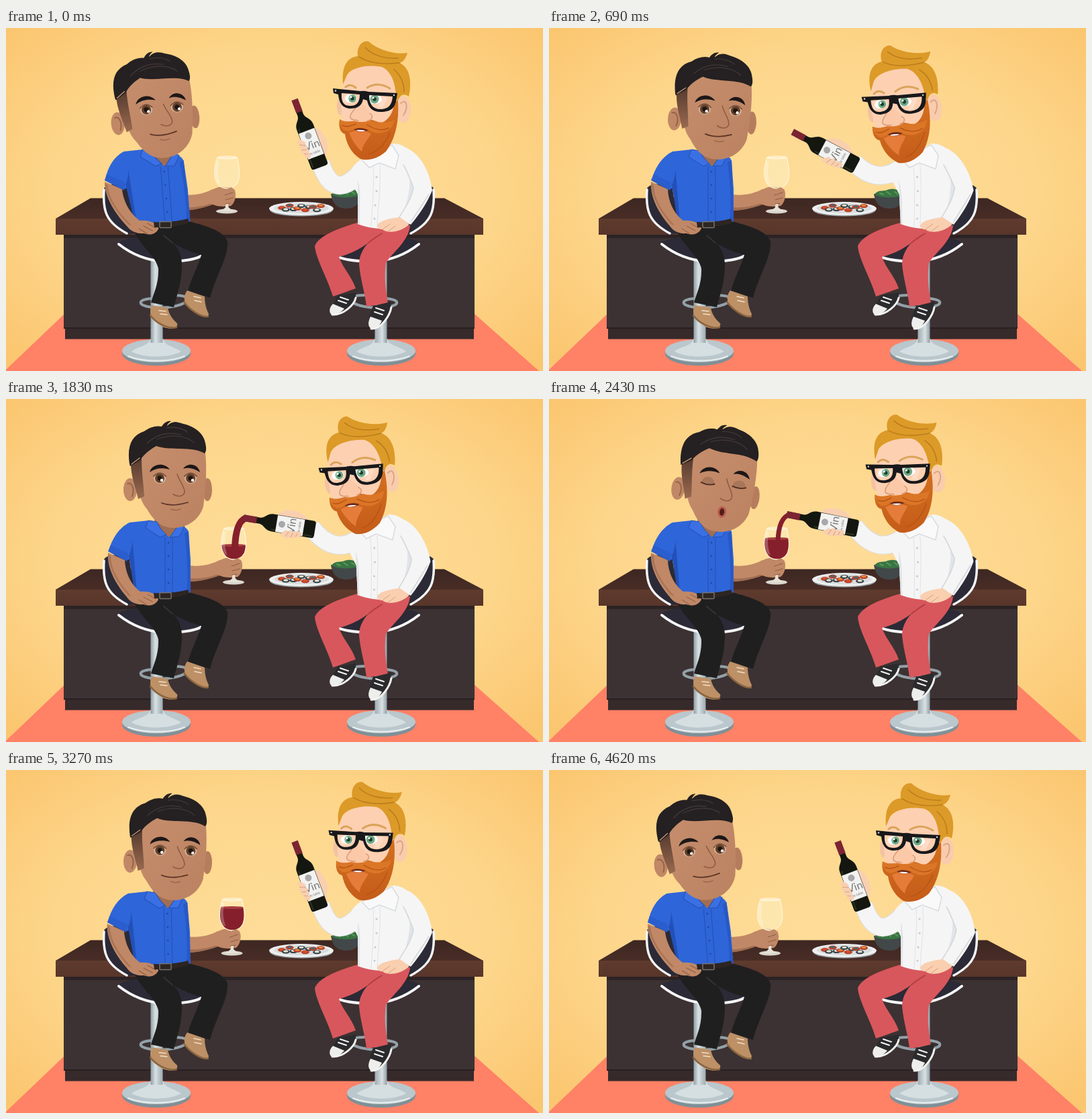
Recreate the animation shown at these times as an HTML page. Size 800x511 px, loop 4.65 s.

```html
<!DOCTYPE html>
<html lang="en">
<head>
<meta charset="utf-8">
<title>Wine bar</title>
<style>
html, body { margin: 0; height: 100%; overflow: hidden; background: #fcd78c; }
svg { display: block; width: 100%; height: 100%; }
.line { fill: none; stroke-linecap: round; stroke-linejoin: round; }
</style>
</head>
<body>
<svg viewBox="0 0 800 511">
<defs>
  <radialGradient id="wall" cx=".5" cy=".48" r=".68"><stop offset="0" stop-color="#fedd99"/><stop offset=".6" stop-color="#fdd68b"/><stop offset="1" stop-color="#fbc670"/></radialGradient>
  <linearGradient id="top" x2="0" y2="1"><stop stop-color="#3d2722"/><stop offset="1" stop-color="#492d26"/></linearGradient>
  <linearGradient id="edge" x2="0" y2="1"><stop stop-color="#5f3b2e"/><stop offset="1" stop-color="#58352a"/></linearGradient>
  <linearGradient id="steel"><stop stop-color="#8f9ea5"/><stop offset=".4" stop-color="#d9e1e4"/><stop offset="1" stop-color="#9dabb1"/></linearGradient>
  <linearGradient id="fade" x2="0" y2="1"><stop stop-color="#4b3329"/><stop offset="1" stop-color="#9a6a50"/></linearGradient>
  <linearGradient id="skin" x2="1" y2="1"><stop stop-color="#c68e6d"/><stop offset="1" stop-color="#bb8261"/></linearGradient>
  <linearGradient id="ginger" x2="0" y2="1"><stop stop-color="#d2701f"/><stop offset="1" stop-color="#c55c1a"/></linearGradient>
  <path id="bowl" d="M325 193C320 208 319 221 324 230C328 237 334 239 339 239C345 239 351 237 355 230C359 221 358 208 354 193Z"/>
  <clipPath id="inBowl"><use href="#bowl"/></clipPath>
  <g id="stool">
    <ellipse cx="224" cy="485" rx="51" ry="18" fill="#7f9097"/>
    <ellipse cx="224" cy="481" rx="51" ry="17" fill="#bac7cc"/>
    <path d="M215 463C213 474 196 474 187 482C205 492 243 492 261 482C250 474 236 474 234 463Z" fill="#d5dee1"/>
    <path class="line" d="M182 489C205 498 244 498 266 489" stroke="#e9eff0" stroke-width="2"/>
    <path class="line" d="M216 403C195 405 196 413 216 416C240 419 268 413 271 404C270 398 250 397 234 399" stroke="#93a1a7" stroke-width="4"/>
    <rect x="215.500" y="338" width="18" height="131" fill="url(#steel)"/>
    <path d="M146 239C150 232 165 231 183 233L194 306L178 307C154 294 145 278 146 239Z" fill="#2b2a36"/>
    <path class="line" d="M146 241C144 271 148 289 180 306" stroke="#f5f6f8" stroke-width="3.500"/>
    <path d="M167 320C185 306 270 306 293 337C280 347 255 350 235 349C205 347 180 337 167 320Z" fill="#2b2a36"/>
    <path class="line" d="M168 322C187 337 208 346 235 348C262 348 282 345 292 339" stroke="#f5f6f8" stroke-width="4"/>
  </g>
</defs>

<rect width="800" height="511" fill="url(#wall)"/>
<path d="M88 425H697L794 511H-2Z" fill="#ff8166"/>

<path d="M126 253.500H653L711 284H74Z" fill="url(#top)"/>
<path d="M86 308H698V447H86Z" fill="#3c3233"/>
<path d="M86 308H698V313H86Z" fill="#2c2324"/>
<path d="M74 284H711V308H74Z" fill="url(#edge)"/>
<path d="M88 447H697V463.500H88Z" fill="#362a2b"/>
<path d="M86 446H698V448H86Z" fill="#282021"/>

<ellipse cx="440" cy="271" rx="47" ry="9.500" fill="#9aa2a6"/>
<ellipse cx="440" cy="269" rx="48" ry="10" fill="#eef0f0"/>
<ellipse cx="440" cy="268.500" rx="41" ry="7.500" fill="#d9dddd"/>
<g id="snacks"></g>
<path d="M484 247C486 262 494 269 507 269S528 262 530 247Z" fill="#42484a"/>
<path d="M485 248C490 240 500 244 504 241C512 238 520 240 530 247C520 254 495 254 485 248Z" fill="#397443"/>
<path class="line" d="M493 246l5 2M503 244l6 4M515 244l4 3" stroke="#5a9a58" stroke-width="2"/>

<use href="#stool"/>
<use href="#stool" transform="translate(783) scale(-1 1)"/>

<g id="glassArm">
  <path d="M262 246C285 252 305 247 318 240L326 260C305 268 288 273 262 272Z" fill="#c08866"/>
  <path d="M262 266C288 270 308 265 324 258L326 260C305 268 288 273 262 272Z" fill="#a06e52"/>
  <path d="M311 246C318 238 330 235 340 237L350 240C354 246 352 260 345 265C332 267 318 266 311 258Z" fill="#c08866"/>
  <ellipse cx="339" cy="273" rx="16" ry="3.500" fill="#d9d5cd"/>
  <path d="M338 238H340.500L341.500 267C345 271 349 272 352 273H326C330 272 334 271 337 267Z" fill="#e6e2d8"/>
  <use href="#bowl" fill="#fdeebf" fill-opacity=".6"/>
  <g clip-path="url(#inBowl)">
    <rect id="wine" x="318" y="205" width="44" height="40" fill="#861f2c"/>
    <ellipse id="surface" cx="339" cy="205" rx="18" ry="2" fill="#a53c40"/>
    <path d="M324 198C321 210 321 222 325 230L330 233C325 220 325 210 328 198Z" fill="#fff" opacity=".25"/>
  </g>
  <use href="#bowl" fill="none" stroke="#fff4d8" stroke-width="1.300"/>
  <ellipse cx="339.500" cy="193" rx="14.500" ry="2" fill="none" stroke="#fffbe9"/>
  <path class="line" d="M333 246L345 241M335 252L348 249M335 259L346 257" stroke="#c08866" stroke-width="7"/>
  <path class="line" d="M336 249L348 245M337 256L348 253M337 262L344 261" stroke="#8a5c42" stroke-width="1"/>
</g>

<path d="M190 301L272 288C300 295 325 303 330 318C332 340 312 370 304 402L271 392C277 370 285 358 291 338C275 334 262 328 248 320C258 328 262 342 262 352C262 380 255 395 250 416L216 409C220 395 228 380 227 358C222 338 200 325 190 301Z" fill="#1f1f20"/>
<path class="line" d="M248 320L235 309" stroke="#343435" stroke-width="2"/>
<path d="M217 413C212 427 216 436 235 446C248 450 257 447 255 440C247 433 243 426 241 417Z" fill="#bd9066"/>
<path d="M270 391C262 402 265 412 280 422C292 431 302 433 302 426C298 418 296 410 296 400Z" fill="#bd9066"/>
<path class="line" d="M215 428C222 438 240 449 254 446M265 408C274 420 290 431 301 430" stroke="#8a6540" stroke-width="2.500"/>
<path class="line" d="M228 421l10 1M230 426l10 1M280 400l10 2M281 406l10 2" stroke="#f0e0c8" stroke-width="1.500"/>

<g id="leftBody">
  <path d="M220 170H262V205L243 214L224 203Z" fill="#a06d52"/>
  <path d="M212 181L226 186C230 194 237 201 243 206L257 190C264 188 270 192 272 198L275 240V288C250 293 215 293 192 290L185 238L181 240L153 226C158 208 168 192 184 184Z" fill="#2e65d8"/>
  <path d="M183 234C188 222 189 212 188 206L195 289H192Z" fill="#2350b8"/>
  <path d="M266 200L272 197L275 288L269 290C272 265 270 230 266 200Z" fill="#2758c6"/>
  <path d="M212 181L208 192L230 206L239 202C232 196 228 190 225 183ZM258 186L244 206L258 205L266 190Z" fill="#3a70e4" stroke="#2450b4"/>
  <path class="line" d="M237 207V289M248 207V289M156 220L182 233" stroke="#2450b4"/>
  <g fill="#1f479f"><circle cx="242" cy="214" r="1.300"/><circle cx="242" cy="234" r="1.300"/><circle cx="242" cy="254" r="1.300"/><circle cx="242" cy="274" r="1.300"/></g>
  <path d="M152 229L177 240C178 262 188 278 200 287C215 286 226 291 227 299C222 308 213 309 205 306C195 307 185 303 180 295C167 280 150 255 152 229Z" fill="#c08866"/>
  <path d="M152 231C153 256 170 279 183 293L187 294C170 276 156 254 156 234Z" fill="#a87457"/>
  <path class="line" d="M205 295L218 302M211 291L223 298M198 299L209 306" stroke="#8a5c42"/>
  <path d="M152 227L156 218L182 230L180 242Z" fill="#2a5dcd"/>
</g>
<path d="M220 289C240 290 256 288 271 284L273 290C258 296 240 297 221 297Z" fill="#2d2521"/>
<rect x="229" y="288.500" width="17" height="9" rx="1" fill="none" stroke="#77726b" stroke-width="1.500"/>

<g id="leftHead">
  <ellipse cx="185" cy="135" rx="10" ry="17" fill="#c08866"/>
  <path class="line" d="M181 126C188 124 192 134 188 145" stroke="#966449" stroke-width="2"/>
  <ellipse cx="300" cy="135" rx="7" ry="17" fill="#b57d5d"/>
  <path d="M192 72C194 120 196 148 210 164C222 185 235 192 250 192C270 192 288 180 294 160C298 130 300 100 296 72C270 60 225 62 192 72Z" fill="url(#skin)"/>
  <path d="M186 96L203 78C200 95 205 125 206 145L197 149C192 128 186 115 186 96Z" fill="url(#fade)"/>
  <path d="M184 97C180 70 187 54 206 48C214 42 224 39 232 41C235 36 240 32 246 33C243 35 240 38 240 40C249 31 258 35 264 37C282 41 295 52 297 66C299 74 298 79 296 81C275 69 245 78 224 70C213 76 205 83 200 91L185 100Z" fill="#252021"/>
  <path class="line" d="M210 66C225 52 243 49 260 53M225 60C245 52 268 54 280 65M240 43C250 41 262 43 270 49" stroke="#403638" stroke-width="1.300"/>
  <path class="line" d="M187 97L199 88" stroke="#c59b7a" stroke-width="1.300"/>
  <path d="M214 109C217 97 235 93 244 105C232 102 223 103 214 109ZM264 104C270 94 286 96 289 109C281 104 272 101 264 104Z" fill="#1d1718"/>
  <g id="leftOpen">
    <ellipse cx="229" cy="118" rx="9" ry="8" fill="#d9b59b"/><ellipse cx="275" cy="118" rx="9" ry="8" fill="#d9b59b"/>
    <circle cx="229" cy="118" r="7" fill="#62402a"/><circle cx="275" cy="118" r="7" fill="#62402a"/>
    <circle cx="229" cy="118" r="3.500" fill="#1e1410"/><circle cx="275" cy="118" r="3.500" fill="#1e1410"/>
    <circle cx="232" cy="121" r="2.200" fill="#fff"/><circle cx="278" cy="121" r="2.200" fill="#fff"/>
    <path class="line" d="M220 115Q229 106 238 115M266 115Q275 106 284 115" stroke="#7a5039" stroke-width="1.800"/>
    <path class="line" d="M232 155C245 160 258 158 271 154" stroke="#5d3526" stroke-width="1.800"/>
    <path class="line" d="M246 164Q253 167 260 164" stroke="#9c694e" stroke-width="1.500"/>
  </g>
  <g id="leftShut">
    <path d="M218 122C220 109 236 109 238 122ZM265 122C267 109 283 109 285 122Z" fill="#a87659"/>
    <path class="line" d="M218 122Q228 126 238 122M265 122Q275 126 285 122" stroke="#4e3022" stroke-width="2"/>
    <ellipse cx="254" cy="162" rx="5" ry="7" fill="#541b1a" stroke="#b95d4e" stroke-width="3"/>
  </g>
  <path class="line" d="M255 112C259 124 267 132 266 139C264 146 256 146 249 142" stroke="#8d5d43" stroke-width="1.600"/>
</g>

<path d="M524 290C495 298 465 310 460 325C462 345 480 375 487 400L521 388C515 370 502 358 496 341C512 337 526 330 540 320C530 330 526 342 526 352C528 375 535 395 537 415L569 410C566 390 563 375 566 350C575 335 600 318 602 294Z" fill="#d8575c"/>
<path class="line" d="M540 320C547 314 554 310 560 306" stroke="#b33f48" stroke-width="2"/>
<path d="M494 399C490 408 482 416 483 424C490 430 502 425 510 418C518 410 522 405 521 394ZM547 414C542 425 538 438 543 446C550 450 560 445 565 436C572 427 575 420 573 408Z" fill="#2b2a2d"/>
<path d="M487 411C481 417 481 424 485 427C493 428 500 423 504 418ZM543 430C539 438 539 445 544 448C551 449 557 443 560 436Z" fill="#eeeeec"/>
<path class="line" d="M486 427C503 428 519 412 521 402M544 448C559 449 572 428 574 416" stroke="#f4f4f2" stroke-width="3"/>
<path class="line" d="M495 406l12 4M498 401l12 4M549 423l12 4M551 417l12 4" stroke="#f4f4f2" stroke-width="2"/>

<path id="sleeveEdge" class="line" stroke="#d9dce0" stroke-width="28" style="stroke-linecap:butt"/>
<path id="sleeve" class="line" stroke="#f5f5f5" stroke-width="26" style="stroke-linecap:butt"/>
<g id="rightBody">
  <path d="M537 192C525 196 515 205 511 220L524 248L524 292C548 301 578 302 597 293L606 238L602 185C596 176 586 172 576 172Z" fill="#f5f5f5"/>
  <path d="M524 226C531 250 525 275 527 293L524 292ZM590 196C608 212 603 252 586 290L597 293L608 238Z" fill="#e1e4e8"/>
  <path d="M590 177C616 182 632 215 635 242C627 262 614 280 603 293L585 283C596 266 606 250 607 238C603 222 596 210 590 198Z" fill="#f5f5f5"/>
  <path class="line" d="M607 238C600 220 596 210 592 204M607 238C604 255 594 269 585 283M630 248L603 289" stroke="#d3d7dc" stroke-width="1.500"/>
  <path d="M530 196L541 208L556 201L580 210L585 190L575 174Z" fill="#f9f9f9" stroke="#d9dce0" stroke-width="1.500"/>
  <path class="line" d="M557 204C559 235 554 265 553 298M547 206C549 240 545 270 544 297" stroke="#dfe2e6"/>
  <g fill="#c4c9d0"><circle cx="552" cy="222" r="1.500"/><circle cx="552" cy="243" r="1.500"/><circle cx="550" cy="264" r="1.500"/><circle cx="549" cy="284" r="1.500"/></g>
</g>
<path d="M587 282C572 283 552 288 553 296C556 300 558 300 561 300C568 307 590 304 601 292Z" fill="#f9cfb0"/>
<path class="line" d="M562 299L572 292M569 303L580 295" stroke="#d99f7e"/>

<g id="rightHead">
  <ellipse cx="592" cy="121" rx="11" ry="20" fill="#f9ccad"/>
  <path class="line" d="M588 112C597 104 600 118 592 130" stroke="#dda584" stroke-width="2"/>
  <ellipse cx="498" cy="117" rx="5" ry="13" fill="#f3c2a2"/>
  <path d="M503 80C498 110 497 140 508 160L570 160C585 140 590 110 585 75C560 45 515 50 503 80Z" fill="#fdd0b2"/>
  <path d="M502 84C500 62 505 44 524 42C522 28 530 18 540 20C555 33 580 40 598 37C596 45 592 50 587 52C602 60 605 80 600 102C592 96 586 100 583 112L580 92C578 75 570 62 560 58C540 54 515 58 508 70Z" fill="#dc9a28"/>
  <path class="line" d="M526 43C540 52 560 55 586 52M535 29C546 41 565 46 584 45M578 62C590 72 593 84 593 95" stroke="#bb7c1c" stroke-width="1.500"/>
  <path class="line" d="M506 88Q513 82 521 89M538 89Q554 79 572 90" stroke="#dba45a" stroke-width="3"/>
  <path d="M584 108C586 140 580 165 566 184C552 196 538 198 528 195C514 186 507 172 505 158C498 156 495 148 497 136C505 142 515 140 525 137C535 133 548 137 558 142C570 138 578 125 578 110Z" fill="url(#ginger)"/>
  <path d="M511 156Q526 149 544 157C540 166 532 171 530 184Q518 174 511 156Z" fill="#e57c39"/>
  <path d="M517 150Q528 147 540 152Q528 158 517 150Z" fill="#6d2618"/>
  <path d="M521 152Q529 151 536 153Q528 156 521 152Z" fill="#fff"/>
  <path d="M497 136C505 142 517 138 527 138C543 134 556 146 579 137C575 156 556 161 542 153C533 147 525 148 515 152C505 157 497 149 497 136Z" fill="#db7627"/>
  <path class="line" d="M501 145C508 149 515 145 521 143M538 144C548 151 560 154 570 149M540 188C555 184 565 172 572 156" stroke="#b85415" stroke-width="1.500"/>
  <path d="M526 109C521 121 511 127 513 135C520 141 537 142 545 136C548 130 541 127 540 122Z" fill="#fbc9a8"/>
  <path class="line" d="M526 111C521 122 511 127 513 134C517 139 522 136 525 138M538 138C546 137 548 131 542 127" stroke="#d79a78" stroke-width="1.500"/>
  <g id="rightOpen">
    <ellipse cx="514" cy="105" rx="9" ry="6.500" fill="#fff"/><ellipse cx="549" cy="106" rx="11" ry="7" fill="#fff"/>
    <circle cx="516" cy="105" r="6" fill="#6fa886"/><circle cx="549" cy="106" r="6.500" fill="#6fa886"/>
    <circle cx="516" cy="105" r="2.800" fill="#1d3b2b"/><circle cx="549" cy="106" r="2.800" fill="#1d3b2b"/>
    <circle cx="514" cy="103" r="1.500" fill="#fff"/><circle cx="547" cy="104" r="1.500" fill="#fff"/>
  </g>
  <path id="rightShut" class="line" d="M505 107Q514 101 523 108M543 109Q555 102 568 110" stroke="#c78f6c" stroke-width="2"/>
  <path d="M487 90L528 94Q534 93 540 95L583 97L582 104C580 119 574 125 558 125C545 125 540 118 538 108L532 106C530 116 524 120 512 120C500 119 496 110 495 99L488 97ZM500 97C499 110 503 116 513 116C523 116 527 110 527 99ZM541 100C541 113 546 121 558 121C569 121 575 115 576 102Z" fill="#18181a" fill-rule="evenodd"/>
  <path d="M506 98L502 109L508 113L516 99ZM562 102L553 118L561 119L569 103Z" fill="#fff" opacity=".25"/>
  <circle cx="491" cy="93.500" r="1.200" fill="#ddd"/><circle cx="578" cy="100" r="1.200" fill="#ddd"/>
</g>

<path id="stream" class="line" stroke="#861f2c"/>
<g id="bottle">
  <path d="M10 0C16 -6 19 0 21 6C25 18 23 34 12 42L-2 52V10Z" fill="#f9cfb0"/>
  <path d="M-4.500 -53H4.500V-29C5 -22 13 -20 13 -10V50Q13 54 9 54H-9Q-13 54 -13 50V-10C-13 -20 -5 -22 -4.500 -29Z" fill="#14170f"/>
  <path d="M-5 -54H5V-34H-5Z" fill="#7c2433"/>
  <path d="M-10 -10V50" class="line" stroke="#2c3322" stroke-width="2"/>
  <path d="M-12.500 -4H12.500V37H-12.500Z" fill="#f2f2f0"/>
  <circle cx="0" cy="4" r="5" fill="#a8a8aa"/>
  <text y="24" text-anchor="middle" font-family="Lato, sans-serif" font-size="16" fill="#77777a">Vin</text>
  <text y="32" text-anchor="middle" font-family="Lato, sans-serif" font-size="5" fill="#77777a">de table</text>
  <path class="line" d="M-15 8L-11 12M-16 15L-10 19M-15 23L-10 26M-13 30L-10 32" stroke="#f9cfb0" stroke-width="6.500"/>
  <path class="line" d="M-17 12L-10 15.500M-17 20L-10 22.500M-15 27L-10 29" stroke="#dba382"/>
</g>
</svg>
<script>
const LOOP = 4650;
const $ = id => document.getElementById(id);

// Rows are [time, ...values], joined by smooth curves that never overshoot.
function track(t, rows) {
  const next = rows.findIndex(row => row[0] > t);
  if (next === 0) return rows[0].slice(1);
  if (next < 0) return rows.at(-1).slice(1);
  const a = rows[next - 1], b = rows[next], span = b[0] - a[0], u = (t - a[0]) / span;
  const rate = (i, col) => (rows[i + 1][col] - rows[i][col]) / (rows[i + 1][0] - rows[i][0]);
  const slope = (i, col) => {
    if (i === 0 || i === rows.length - 1) return 0;
    const before = rate(i - 1, col), after = rate(i, col);
    return before * after > 0 ? 2 * before * after / (before + after) : 0;
  };
  return a.slice(1).map((v, i) => {
    const rise = b[i + 1] - v, m0 = slope(next - 1, i + 1) * span, m1 = slope(next, i + 1) * span;
    return v + u * (m0 + u * (3 * rise - 2 * m0 - m1 + u * (m0 + m1 - 2 * rise)));
  });
}

const LEFT_HEAD = [[60, -13.6, 2, -5], [690, -1, 3.5, 3], [1830, 0, 0, 0], [2430, 0, 5, 7],
  [3270, -1, 2, 1], [3810, -13, 2, -4.5], [4500, -13.6, 2, -5]];
const RIGHT_HEAD = [[60, 0, 0, 0], [690, -8, 5, -8], [1830, -8, 5, -8], [2430, -7, 3, -5],
  [3270, -3, -2, -2], [3810, -4, -2, -3], [4600, 0, 0, 0]];
const LEFT_LEAN = [[60, -8], [690, 0], [2900, 0], [4050, -8]];
const RIGHT_LEAN = [[60, 0], [750, -5], [2450, -5], [3200, 0]];
const BOTTLE = [[60, 449, 157, -20.6], [690, 410.5, 180, -62], [1200, 407, 186, -80.5], [1830, 407, 186, -80.5],
  [2430, 407, 182.5, -78.6], [2550, 407, 182.5, -78.6], [3180, 449, 157, -20.6]];
const FLOW = [[1200, 0], [1350, 10], [1830, 10], [2430, 7], [2520, 7], [2650, 0]];
const LEVEL = [[1280, 240], [1830, 218], [2430, 208], [2700, 205], [3900, 205], [4500, 240]];

const place = (id, value) => $(id).setAttribute('transform', value);
const show = (id, on) => $(id).style.display = on ? '' : 'none';
const lean = (id, d) => place(id, `matrix(1 0 ${-d / 105} 1 ${d / 105 * 295} 0)`);
const nod = (id, [x, y, angle], px, py) => place(id, `translate(${x} ${y}) rotate(${angle} ${px} ${py})`);

function draw(now) {
  const t = now % LOOP;
  const [leftLean] = track(t, LEFT_LEAN), [rightLean] = track(t, RIGHT_LEAN);
  nod('leftHead', track(t, LEFT_HEAD), 245, 192);
  nod('rightHead', track(t, RIGHT_HEAD), 535, 190);
  lean('leftBody', leftLean);
  lean('rightBody', rightLean);
  place('glassArm', `translate(${leftLean * 1.25})`);

  const whistling = t >= 2190 && t < 2640;
  show('leftOpen', !whistling);
  show('leftShut', whistling);
  const blinking = t >= 3750 && t < 3900;
  show('rightOpen', !blinking);
  show('rightShut', blinking);

  const [x, y, tilt] = track(t, BOTTLE);
  place('bottle', `translate(${x} ${y}) rotate(${tilt})`);
  const cos = Math.cos(tilt * Math.PI / 180), sin = Math.sin(tilt * Math.PI / 180);
  const world = (lx, ly) => [x + lx * cos - ly * sin, y + lx * sin + ly * cos];
  const bend = -rightLean / 5;
  const arm = `M${world(3, 48)}Q488 ${262 - 27 * bend} ${532 - 5 * bend} ${211 - 4 * bend}`;
  $('sleeve').setAttribute('d', arm);
  $('sleeveEdge').setAttribute('d', arm);

  const [level] = track(t, LEVEL), [flow] = track(t, FLOW);
  $('wine').setAttribute('y', level);
  $('surface').setAttribute('cy', level);
  const [tipX, tipY] = world(0, -51);
  $('stream').setAttribute('d', `M${tipX} ${tipY}Q342 ${tipY + 6} 341 ${Math.min(level + 4, 230)}`);
  $('stream').setAttribute('stroke-width', flow);
  show('stream', flow > 0.1);
}

const FILLINGS = ['#d9512c', '#e58a3c', '#4d6a70'];
$('snacks').innerHTML = Array.from({ length: 11 }, (_, i) => {
  const cx = 411 + i * 5.8, cy = 268 + 3.5 * Math.sin(i * 2.3);
  return `<ellipse cx="${cx}" cy="${cy}" rx="6" ry="3" fill="${i % 2 ? '#34444a' : '#b8412a'}"/>
    <ellipse cx="${cx}" cy="${cy - 0.7}" rx="3.500" ry="1.600" fill="${i % 2 ? '#e9e2d2' : FILLINGS[i % 3]}"/>`;
}).join('');

const start = performance.now();
(function frame() {
  draw(performance.now() - start);
  requestAnimationFrame(frame);
})();
</script>
</body>
</html>
```
